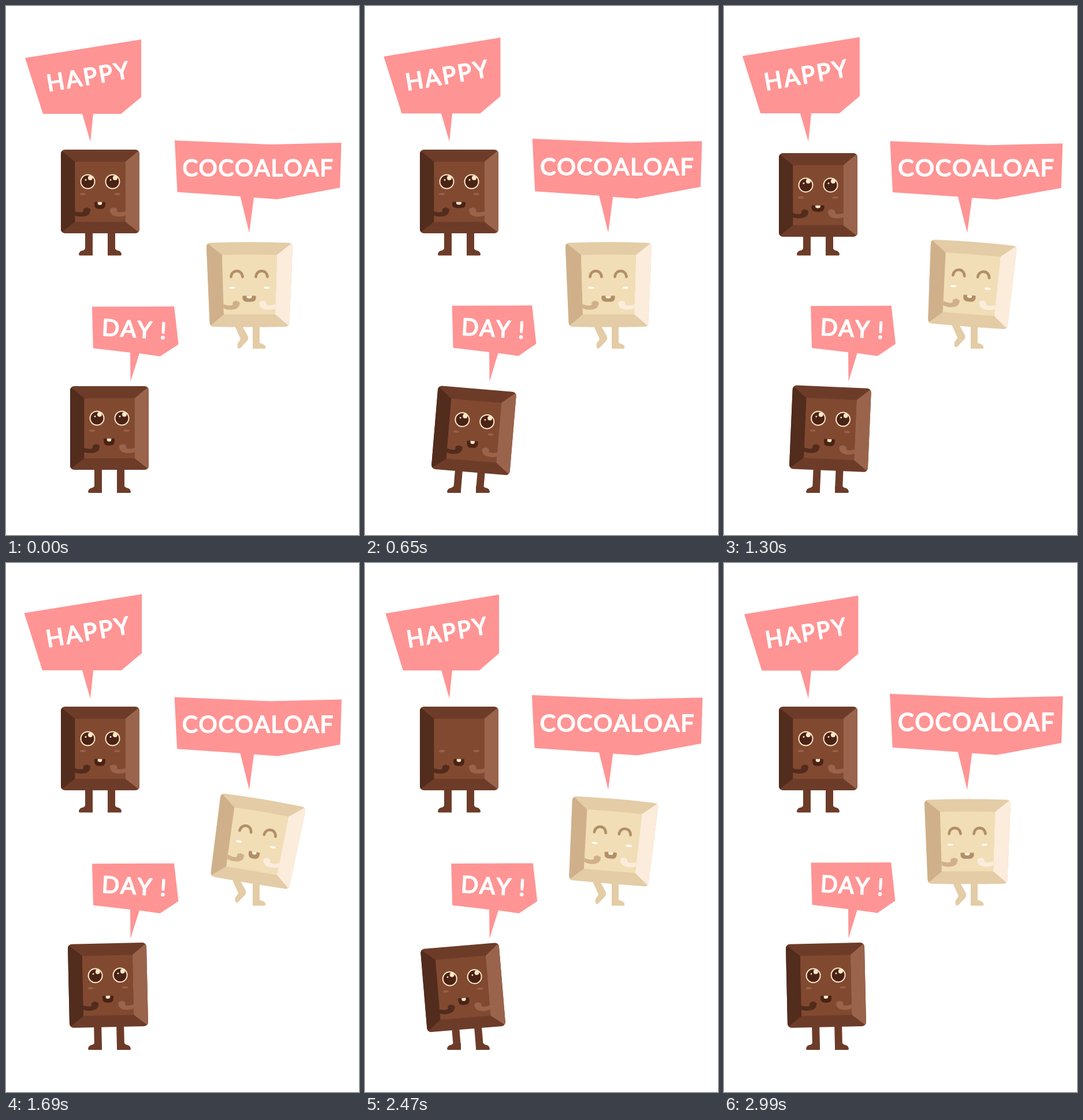
An HTML page for the animation above (3.12 s loop, 611 by 917 pixels).

```html
<!DOCTYPE html>
<html lang="en">
<head>
<meta charset="utf-8">
<title>Happy sweets</title>
<style>
  html, body { margin: 0; width: 100%; height: 100%; overflow: hidden; background: #fff; }
  svg { display: block; width: 100vw; height: 100vh; }
  text {
    font: 400 40px Lato, sans-serif; fill: #fff; stroke: #fff; stroke-width: 1.9;
    stroke-linejoin: round; stroke-linecap: round; font-kerning: none;
  }
</style>
</head>
<body>
<svg id="stage" viewBox="0 0 611 917"></svg>
<script>
const STEP = 130, COUNT = 24;
const stage = document.getElementById('stage');
const set = (id, name, value) => document.getElementById(id).setAttribute(name, value);
const mirror = s => `<g transform="scale(-1 1)">${s}</g>`;
const path = (d, fill) => `<path d="${d}" fill="${fill}"/>`;
const circle = (x, y, r, fill) => `<circle cx="${x}" cy="${y}" r="${r}" fill="${fill}"/>`;

const DARK = {
  rim: '#6d3c29', face: '#824931', left: '#522c1d', right: '#9a644c',
  mouth: '#4a2316', tooth: '#fce8c4', cheek: '#9b6048'
};
const WHITE = {
  rim: '#e3cca6', face: '#f1deb6', left: '#d0b08b', right: '#fcecdc',
  mouth: '#b28f67', tooth: '#fcf0dc', cheek: '#fffaf2'
};

const ARM = 'M-45 34Q-34 38-29 35Q-30 28-25.5 29Q-23 26.5-21 29Q-16.5 28.5-17 33Q-18 43-32 43.5Q-39 44-45 41Z';
const FOOT = 'M-13 110.5H-35Q-37 110.5-37 108.5Q-36 102-29 101.5L-26 99H-13Z';

const arms = (id, c) => `<g id="${id}">${path(ARM, c.left)}${mirror(path(ARM, c.right))}</g>`;
const cheeks = (c, y) => [-30, 29.5].map(x =>
  `<ellipse cx="${x}" cy="${y}" rx="5.2" ry="1.9" fill="${c.cheek}"/>`).join('');
const mouth = (id, c) => `<g id="${id}">` +
  path('M-8.5 0H8.5Q9.5 0 9.5 1V4Q9.5 12 2 12H-2Q-9.5 12-9.5 4V1Q-9.5 0-8.5 0Z', c.mouth) +
  path('M-3.7 0H3.7V2.5Q3.7 5.2 0 5.2Q-3.7 5.2-3.7 2.5Z', c.tooth) + '</g>';

function roundEyes(id) {
  const eye = x => circle(x, -17, 13, DARK.tooth) + circle(x, -17, 11, DARK.mouth) +
    circle(x + 4.4, -23.6, 4, DARK.tooth) + circle(x - 3.5, -20, 1.4, DARK.tooth);
  return `<g id="${id}">${eye(-21.5)}${eye(21.5)}</g>`;
}

function darkBar(id) {
  const side = 'M-66-70L-43.5-51.5V52.5L-66 70Q-68 68-68 65V-65Q-68-68-66-70Z';
  return `<g id="${id}"><rect x="-68" y="-72.5" width="136" height="145" rx="7" fill="${DARK.rim}"/>` +
    path(side, DARK.left) + mirror(path(side, DARK.right)) +
    `<rect x="-43.5" y="-51.5" width="87" height="104" fill="${DARK.face}"/>` +
    cheeks(DARK, 4.5) + roundEyes(id + 'Eyes') + mouth(id + 'Mouth', DARK) +
    arms(id + 'Arms', DARK) + '</g>';
}

function darkLegs(id, x, y) {
  const foot = path(FOOT, DARK.rim);
  const leg = n => `<line id="${id}Leg${n}" stroke="${DARK.rim}" stroke-width="13"/>`;
  return `<g transform="translate(${x} ${y})">${foot}${mirror(foot)}${leg(0)}${leg(1)}</g>`;
}

function whiteBar() {
  const side = 'M-72-71L-47.5-51.5L-44.5 51.5L-67 70.5Q-68.5 69-69 66L-74.5-65Q-74.5-69-72-71Z';
  const arc = x => `<path d="M${x - 10} -13.5C${x - 9} -27 ${x + 9} -27 ${x + 10} -13.5" fill="none"
    stroke="${WHITE.mouth}" stroke-width="4.6" stroke-linecap="round"/>`;
  return '<g id="white">' +
    path('M-68-72.5Q0-75 68-72.5Q75-72 74.5-65L69 66Q68.5 73 62 73Q0 74 -62 73Q-68.5 73-69 66L-74.5-65Q-75-72-68-72.5Z', WHITE.rim) +
    path(side, WHITE.left) + mirror(path(side, WHITE.right)) +
    path('M-47.5-51.5Q0-53 47.5-51.5L44.5 51.5H-44.5Z', WHITE.face) +
    arc(-22) + arc(21) + cheeks(WHITE, 5.3) + mouth('whiteMouth', WHITE) +
    arms('whiteArms', WHITE) + '</g>';
}

const whiteLegs = '<g id="kick">' +
  path('M397 540H409V555L418 571Q421 577 417 581L406 592.5Q402 596 400.5 590Q400 584 404 581L406 577L397 557Z', WHITE.rim) +
  '</g>' +
  path('M427 545H439V584L443 585.5Q449 587 449.5 592Q449.5 594 447 594H427Z', WHITE.rim);

const bubble = (id, points, label) =>
  `<g id="${id}"><polygon points="${points}" fill="#ff9494"/>${label}</g>`;

stage.innerHTML =
  bubble('happy', '33,90 234,58 234,158 199,187 151,187 146,235 132,187 64,187',
    '<text transform="translate(145.3 136) rotate(-9.7)" text-anchor="middle" letter-spacing="3.2">HAPPY</text>') +
  bubble('treat', '292,233 457,240 580.5,237 578,315 470,335 429,332 421,393 405.5,330 296.5,322.5',
    '<text x="436.5" y="294.5" text-anchor="middle" letter-spacing="1.7">COCOALOAF</text>') +
  bubble('day', '148.5,520.5 291.5,520 299,586 267,607 231,602 215.5,651 215,600.5 150.5,593',
    '<text transform="translate(165 570.5) rotate(3.3)" letter-spacing="2.2">DAY !</text>') +
  darkLegs('top', 163, 322) + darkBar('top') +
  whiteLegs + whiteBar() +
  darkLegs('low', 179, 733.5) + darkBar('low');

function smooth(a, b, x) {
  const u = Math.min(1, Math.max(0, (x - a) / (b - a)));
  return u * u * (3 - 2 * u);
}

// Steady growth that snaps back once per loop.
const ramp = (k, rate, reset, drop) => 1 + rate * k - (k >= reset ? drop : 0);

function scaleAt(id, x, y, sx, sy) {
  set(id, 'transform', `translate(${x} ${y}) scale(${sx} ${sy}) translate(${-x} ${-y})`);
}

const shift = (id, x, y) => set(id, 'transform', `translate(${x} ${y})`);

function setMouth(id, y, wide) {
  set(id, 'transform', `translate(-.5 ${y}) scale(${1 + .22 * wide} ${1 - .12 * wide})`);
}

function setLegs(id, lean) {
  [-19.5, 19.5].forEach((x, n) => {
    const ends = { x1: x + lean, y1: 66, x2: x, y2: 106 };
    for (const key in ends) set(id + 'Leg' + n, key, ends[key]);
  });
}

function drawBubbles(k) {
  const swell = Math.sqrt(Math.sin(Math.PI * k / COUNT));
  const wave = Math.cos(2 * Math.PI * (k - 6.7) / 18);
  scaleAt('happy', 146, 235, ramp(k, .001, 16, .041), 1 + .023 * swell);
  scaleAt('treat', 421, 393, ramp(k, .0036, 12, .044), ramp(k, .0036, 7, .044));
  scaleAt('day', 215.5, 651, .983 - .017 * wave, 1 + .009 * wave);
}

function drawTop(k) {
  const up = smooth(9, 12, k);
  const dip = 8 * (smooth(5, 8, k) - up);
  shift('top', 163, 321.5 + dip);
  shift('topArms', 0, -dip / 2);
  set('topEyes', 'visibility', k === 19 ? 'hidden' : 'visible');
  setMouth('topMouth', 18.3, smooth(0, 5, k) - up);
  setLegs('top', 0);
}

function drawWhite(k) {
  const tilt = smooth(7.3, 13, k) - smooth(16, 22, k);
  set('white', 'transform',
    `translate(421.5 ${556 - 1.5 * tilt}) rotate(${9.6 * tilt}) translate(0 -73)`);
  shift('whiteArms', 0, -3 * tilt);
  shift('kick', -4 * tilt, -5 * tilt);
  setMouth('whiteMouth', 19.3 - tilt, 1 - tilt);
}

function drawLow(k) {
  const s = Math.sin(2 * Math.PI * k / COUNT);
  set('low', 'transform', `translate(${179 + 9.7 * s} ${731.5 + 4.6 * s * s}) rotate(${4.95 * s})`);
  setMouth('lowMouth', 18.3, 0);
  setLegs('low', 3.5 * s);
}

const start = performance.now();
function tick() {
  const k = Math.floor((performance.now() - start) / STEP) % COUNT;
  for (const draw of [drawBubbles, drawTop, drawWhite, drawLow]) draw(k);
  requestAnimationFrame(tick);
}
tick();
</script>
</body>
</html>
```
